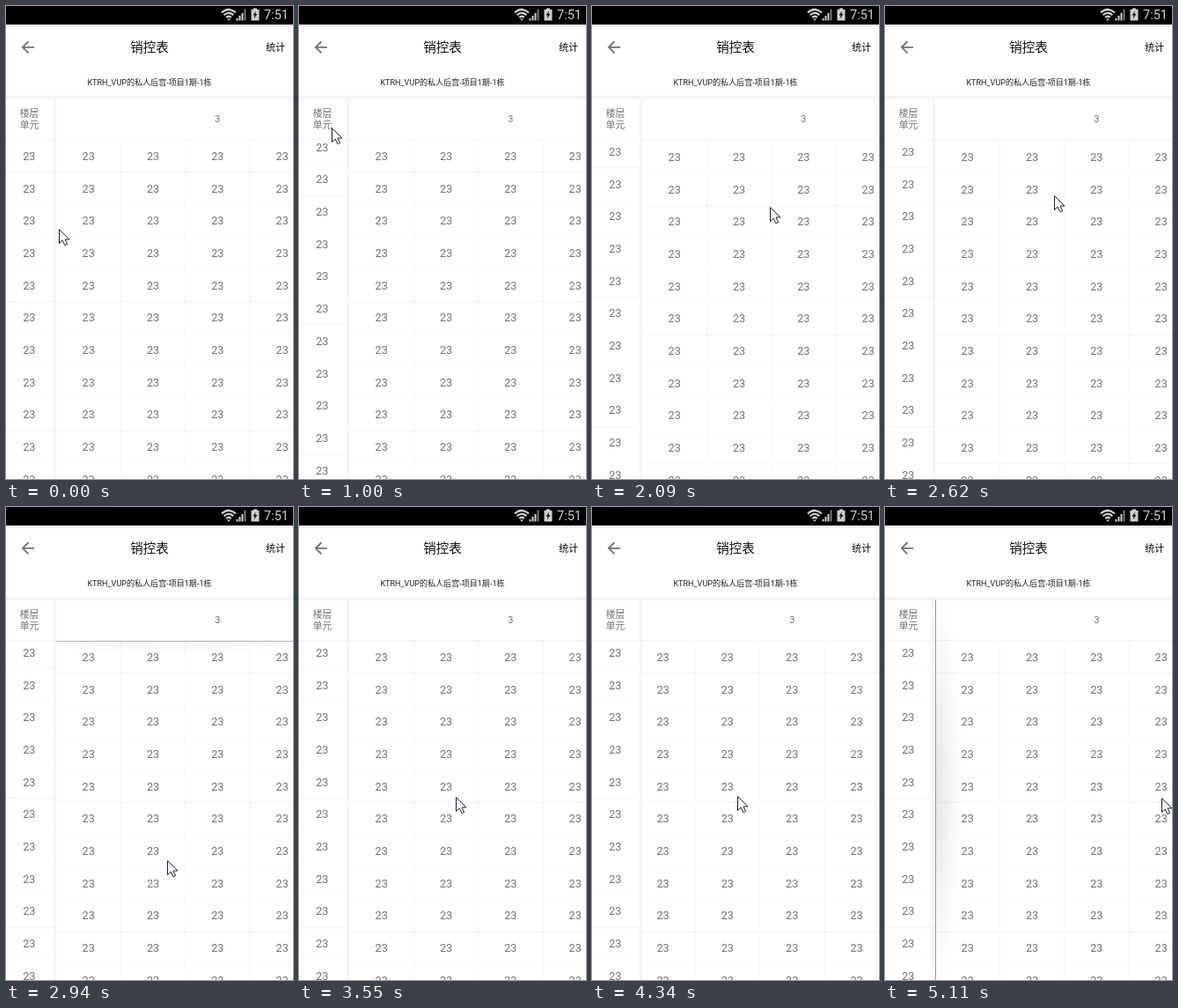
Animation, 326 px wide and 537 px high, one loop 5190 ms. Source, as an HTML page:

```html
<!DOCTYPE html>
<html lang="zh">
<head>
<meta charset="utf-8">
<title>销控表</title>
<style>
  html, body { margin: 0; width: 100%; height: 100%; overflow: hidden; background: #fff; }
  #stage { position: relative; width: 326px; height: 537px; overflow: hidden; background: #fff;
    font-family: Roboto, "Noto Sans CJK SC", "Noto Sans CJK", sans-serif; color: #727272; }
  #stage div, #stage svg { position: absolute; }
  .text { white-space: nowrap; text-align: center; }
  #status { left: 0; top: 0; width: 326px; height: 21px; background: #000; }
  #shade { left: 0; top: 21px; width: 326px; height: 4px; background: linear-gradient(#e4e4e4, #fff); }
  #clock { right: 5px; top: 0; font-size: 14.5px; line-height: 21px; color: #d0d0d0; }
  #title { left: 0; width: 326px; top: 37px; font-size: 14.5px; line-height: 21px; font-weight: 500; color: #111; }
  #stats { right: 9px; top: 39px; font-size: 10.87px; line-height: 17px; font-weight: 500; color: #000; }
  #place { left: 0; width: 326px; top: 80px; font-size: 9.06px; line-height: 14px; color: #222; }
  #band { left: 0; top: 101.5px; width: 326px; height: 4px; background: #f4f4f4; }
  #post { left: 54px; top: 105px; width: 3px; height: 432px; background: #f4f4f4; }
  #corner { left: 0; top: 117px; width: 53px; font-size: 10.87px; line-height: 12.8px; }
  .pane { overflow: hidden; }
  #head { left: 57px; top: 105px; width: 269px; height: 47px; }
  #head .text { width: 366.75px; height: 47px; line-height: 47.5px; font-size: 10.87px; }
  .rule { background: #f3f3f3; height: 1px; }
  #left { left: 0; top: 152px; width: 54px; height: 385px; }
  #main { left: 57px; top: 152px; width: 269px; height: 385px; }
  .cell { font-size: 12.68px; height: 36.68px; line-height: 37px; }
  .glow { opacity: 0; }
  .top { height: 16px;
    background: linear-gradient(#b4b4b4, #b4b4b4) 0 0 / 100% 1px no-repeat,
      radial-gradient(ellipse 62% 100% at 50% 0, rgba(0,0,0,.05), rgba(0,0,0,.02) 55%, transparent); }
  .side { left: 57px; top: 105px; width: 32px; height: 432px;
    background: linear-gradient(#999, #999) 0 0 / 1px 100% no-repeat,
      radial-gradient(ellipse 100% 56% at 0 50%, rgba(0,0,0,.11), rgba(0,0,0,.04) 55%, transparent); }
</style>
</head>
<body>
<div id="stage">
  <div id="status">
    <svg width="326" height="21">
      <g fill="none" stroke="#d0d0d0" stroke-width="2.2">
        <path d="M245 7.500Q253 .5 261 7.500"/>
        <path d="M247.600 10.300Q253 5.500 258.400 10.300"/>
        <path d="M250.200 13Q253 10.500 255.800 13"/>
      </g>
      <path d="M251 14.500h4l-2 2.300z" fill="#d0d0d0"/>
      <path d="M261.500 14h2v2.500h-2zM264.500 11h2v5.500h-2zM267.500 8h2v8.500h-2z" fill="#d0d0d0"/>
      <path d="M270.500 3.500h2v13h-2z" fill="#777"/>
      <path d="M281 2.500h4v1.500h2.500v12.500h-9V4h2.500z" fill="#cfcfcf"/>
      <path d="M284 5.500l-3.500 5h2l-.8 4 3.800-5.500h-2.200z" fill="#111"/>
    </svg>
    <div id="clock" class="text">7:51</div>
  </div>
  <div id="shade"></div>
  <svg style="left:14px;top:35.6px" width="21.7" height="21.7" viewBox="0 0 24 24">
    <path d="M20 11H7.830l5.590-5.590L12 4l-8 8 8 8 1.410-1.410L7.830 13H20z" fill="#737373"/>
  </svg>
  <div id="title" class="text">销控表</div>
  <div id="stats" class="text">统计</div>
  <div id="place" class="text">KTRH_VUP的私人后宫-项目1期-1栋</div>

  <div id="head" class="pane"><div id="headRow"></div></div>
  <div id="left" class="pane"><div id="leftRows"></div></div>
  <div id="main" class="pane"><div id="mainRows"></div></div>
  <div class="rule" style="left:0;top:151px;width:326px"></div>
  <div id="corner" class="text">楼层<br>单元</div>
  <div id="band"></div>
  <div id="post"></div>

  <div id="leftGlow" class="glow top" style="left:0;top:152px;width:54px"></div>
  <div id="mainGlow" class="glow top" style="left:57px;top:152px;width:269px"></div>
  <div id="sideGlow" class="glow side"></div>

  <svg id="cursor" style="left:0;top:0" width="13" height="20">
    <path d="M.5 .7V16.600L4.200 13.100L6.900 18.700L9.600 17.500L7 12H11.900z"
      fill="#fff" stroke="#1a1a2a" stroke-width="1"/>
  </svg>
</div>
<script>
const LOOP = 5190, STEP = 77, ROW = 36.68, COL = 73.35, ROWS = 18, COLS = 7;
const $ = id => document.getElementById(id);
const px = n => n.toFixed(2) + 'px';

function add(parent, cls, css, text = '') {
  const el = document.createElement('div');
  el.className = cls;
  el.textContent = text;
  Object.assign(el.style, css);
  parent.append(el);
}

function fillRows(parent, cols, width, shift) {
  for (let r = 0; r < ROWS; r++) {
    for (let c = 0; c < cols; c++) {
      add(parent, 'text cell', { left: px(c * width + shift), top: px(r * ROW), width: px(width) }, '23');
    }
    // thin rules lose most of their weight, except every fourth
    add(parent, 'rule', { left: 0, top: px((r + 1) * ROW - .5), width: px(cols * width),
      opacity: r % 4 ? .3 : 1 });
  }
}
fillRows($('leftRows'), 1, 54, -.7);
fillRows($('mainRows'), COLS, COL, 0);
for (let c = 1; c < COLS; c++) {
  add($('mainRows'), 'rule', { left: px(c * COL - .5), top: 0, width: '1px', height: px(ROWS * ROW), opacity: .75 });
}
add($('headRow'), 'text', { left: 0, top: 0 }, '3');
add($('headRow'), 'rule', { left: px(5 * COL - .5), top: 0, width: '1px', height: '47px' });

// pointer gestures: where each ends, how it slows, which pane it drags
const gestures = [
  { from: 70, to: 380, x: 23, y: 340, slow: 1 },
  { from: 530, to: 1000, x: 37, y: 138, slow: 1.5, pane: 'left', gain: 1.323 },
  { from: 1090, to: 1470, x: 34, y: 425, slow: 1.2, pane: 'left', gain: 1 },
  { from: 1620, to: 1850, x: 209, y: 340, slow: 1.2, pane: 'left', gain: .29 },
  { from: 2010, to: 2470, x: 196, y: 119, slow: 2.1, pane: 'main', gain: .97 },
  { from: 2550, to: 3020, x: 181, y: 443, slow: 1.05, pane: 'main', gain: 1.09 },
  { from: 3090, to: 3550, x: 178, y: 329, slow: 1.2 },
  { from: 3630, to: 4100, x: 59, y: 326, slow: 1.05, pane: 'side', gain: 1 },
  { from: 4270, to: 4570, x: 290, y: 330, slow: 1.2, pane: 'side', gain: 1 },
  { from: 4880, to: 5110, x: 314, y: 330, slow: 1.5, pane: 'side', gain: 1 }
];

// A positive pane value is a pull beyond the edge; it fades once let go.
function makePoses() {
  const poses = [{ time: 0, x: 60, y: 253, left: 0, main: 0, side: 0 }];
  for (const g of gestures) {
    const a = poses[poses.length - 1];
    const n = Math.round((g.to - g.from) / STEP) + 1;
    for (let i = 0; i < n; i++) {
      const last = poses[poses.length - 1];
      const e = 1 - (1 - (i + 1) / n) ** g.slow;
      const dx = (g.x - a.x) * e, dy = (g.y - a.y) * e;
      const pose = { time: Math.floor((g.from + (g.to - g.from) * i / (n - 1)) / 10) * 10,
        x: a.x + dx, y: a.y + dy };
      for (const name of ['left', 'main', 'side']) {
        if (name === g.pane) pose[name] = a[name] + (name === 'side' ? dx : dy) * g.gain;
        else pose[name] = last[name] > 0 ? last[name] * .7 : last[name];
      }
      poses.push(pose);
    }
  }
  return poses;
}
const poses = makePoses();

const move = (id, x, y) => { $(id).style.transform = `translate(${px(x)}, ${px(y)})`; };

function draw(time) {
  const p = poses.filter(s => s.time <= time).pop();
  const scroll = name => Math.min(0, p[name]);
  move('cursor', Math.round(p.x), Math.round(p.y));
  move('leftRows', 0, scroll('left') + .05);
  move('mainRows', scroll('side'), scroll('main') + .05);
  move('headRow', scroll('side'), 0);
  for (const name of ['left', 'main', 'side']) {
    $(name + 'Glow').style.opacity = Math.min(1, Math.max(0, p[name] / 90));
  }
}

const start = performance.now();
function tick() {
  draw((performance.now() - start) % LOOP);
  requestAnimationFrame(tick);
}
tick();
</script>
</body>
</html>
```
